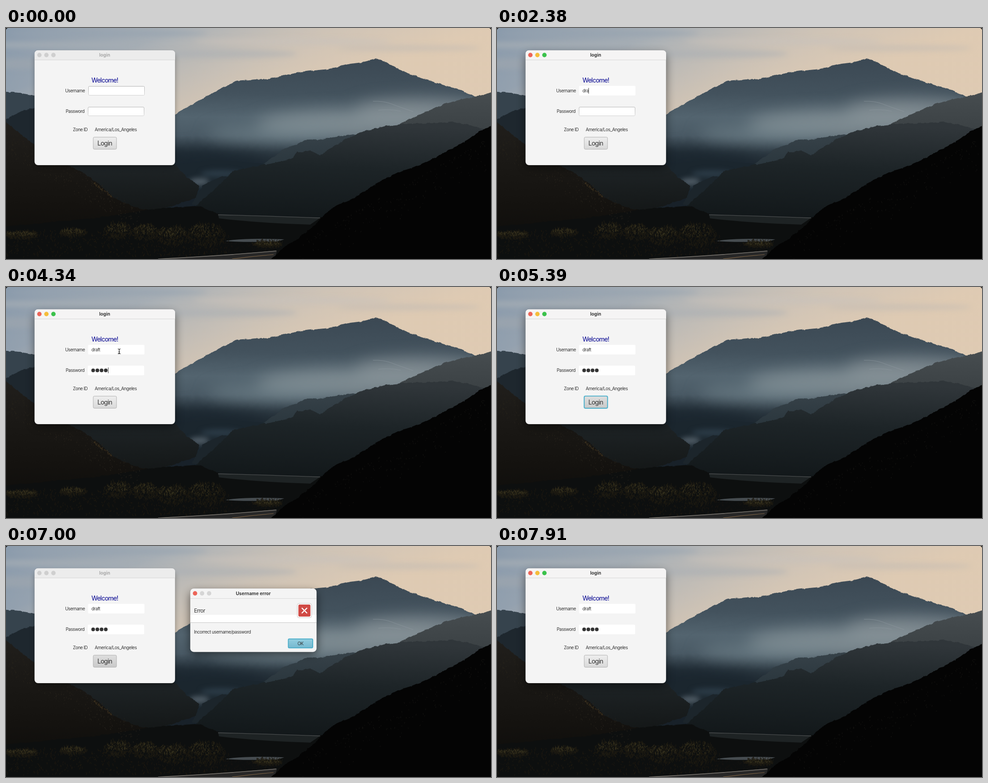
Animation, 1084 px wide and 517 px high, one loop 8 s. Source, as an HTML page:

```html
<!DOCTYPE html>
<html lang="en">
<head>
<meta charset="utf-8">
<title>login</title>
<style>
html, body { margin: 0; width: 100%; height: 100%; overflow: hidden; background: #0b0e10; }
svg { position: absolute; left: 0; top: 0; }
filter { color-interpolation-filters: sRGB; }
text { font: 10px Inter, sans-serif; letter-spacing: -.057em; fill: #333; }
.mid { text-anchor: middle; }
.big { font-size: 14.1px; }
.title { font-weight: 700; font-size: 10.2px; letter-spacing: 0; fill: #3a3a3a; }
</style>
</head>
<body>
<svg id="photo" width="1084" height="517" viewBox="0 0 1084 517">
  <defs>
    <linearGradient id="sky" x2="1" y2=".12">
      <stop offset="0" stop-color="#8b9bac"/><stop offset=".35" stop-color="#abb1b6"/>
      <stop offset=".65" stop-color="#c1bdb8"/><stop offset="1" stop-color="#cbc1b7"/>
    </linearGradient>
    <linearGradient id="warm" gradientUnits="userSpaceOnUse" x1="480" y1="-30" x2="560" y2="190">
      <stop offset="0" stop-color="#dfccb6" stop-opacity="0"/><stop offset="1" stop-color="#e2ccb2" stop-opacity=".85"/>
    </linearGradient>
    <linearGradient id="peak" gradientUnits="userSpaceOnUse" x1="0" y1="68" x2="0" y2="330">
      <stop offset="0" stop-color="#3b4853"/><stop offset=".3" stop-color="#43525d"/>
      <stop offset=".5" stop-color="#53646f"/><stop offset=".66" stop-color="#4a5a65"/>
      <stop offset=".8" stop-color="#27333c"/><stop offset="1" stop-color="#182129"/>
    </linearGradient>
    <linearGradient id="far" x2="0" y2="1">
      <stop offset="0" stop-color="#474d50"/><stop offset="1" stop-color="#373d40"/>
    </linearGradient>
    <linearGradient id="step" x2="0" y2="1">
      <stop offset="0" stop-color="#374249"/><stop offset="1" stop-color="#28343b"/>
    </linearGradient>
    <linearGradient id="ridge" x1=".3" x2=".2" y2="1">
      <stop offset="0" stop-color="#30363a"/><stop offset=".4" stop-color="#1d2427"/>
      <stop offset="1" stop-color="#101517"/>
    </linearGradient>
    <linearGradient id="left" x2="0" y2="1">
      <stop offset="0" stop-color="#211f1c"/><stop offset=".6" stop-color="#14120f"/><stop offset="1" stop-color="#0a0a09"/>
    </linearGradient>
    <linearGradient id="valley" x2="0" y2="1">
      <stop offset="0" stop-color="#22282b"/><stop offset="1" stop-color="#131616"/>
    </linearGradient>
    <filter id="soft" x="-50%" y="-100%" width="200%" height="300%"><feGaussianBlur stdDeviation="18"/></filter>
    <filter id="haze" x="-50%" y="-100%" width="200%" height="300%"><feGaussianBlur stdDeviation="6"/></filter>
    <filter id="rough" filterUnits="userSpaceOnUse" x="-10" y="0" width="1104" height="530">
      <feTurbulence type="fractalNoise" baseFrequency=".09" numOctaves="3" seed="4"/>
      <feDisplacementMap in="SourceGraphic" scale="5" xChannelSelector="R" yChannelSelector="G"/>
    </filter>
    <clipPath id="peakClip"><path d="M300 232 378 194 450 154 514 120 590 115 660 100 720 94 770 82 795 79 826 70 845 76 900 105 960 124 1020 142 1048 155 1084 162V340H300Z"/></clipPath>
  </defs>

  <rect width="1084" height="240" fill="url(#sky)"/>
  <rect width="1084" height="240" fill="url(#warm)"/>
  <g filter="url(#haze)">
    <ellipse cx="100" cy="38" rx="190" ry="7" fill="#a9afb6" opacity=".7"/>
    <ellipse cx="230" cy="12" rx="220" ry="8" fill="#95a2af" opacity=".6"/>
    <ellipse cx="480" cy="58" rx="170" ry="9" fill="#a8aeb3" opacity=".5"/>
    <ellipse cx="640" cy="30" rx="220" ry="7" fill="#c9c2bb" opacity=".7"/>
    <ellipse cx="900" cy="45" rx="160" ry="7" fill="#bfb9b4" opacity=".5"/>
    <ellipse cx="30" cy="80" rx="110" ry="12" fill="#9da5ae" opacity=".7"/>
  </g>

  <g filter="url(#rough)">
    <path d="M300 230 378 192 450 152 514 118 590 113 660 98 720 92 770 80 795 77 826 68 845 74 900 103 960 122 1020 140 1048 153 1084 160V440H300Z" fill="url(#peak)"/>
  </g>
  <g clip-path="url(#peakClip)">
    <g filter="url(#soft)">
      <ellipse cx="770" cy="216" rx="210" ry="32" fill="#929da2" opacity=".7"/>
      <ellipse cx="600" cy="238" rx="150" ry="22" fill="#76878f" opacity=".6"/>
      <ellipse cx="920" cy="180" rx="140" ry="22" fill="#929b9f" opacity=".7"/>
      <ellipse cx="450" cy="295" rx="130" ry="22" fill="#18232c" opacity=".8"/>
    </g>
    <path d="M820 164q24-1 42 6t48 17M832 184q25-3 50 2" fill="none" stroke="#919ca2" opacity=".6"/>
  </g>
  <g filter="url(#rough)">
    <path d="M860 225 885 212 940 187 980 170 1020 159 1060 152 1084 144 1094 141V260H860Z" fill="url(#far)"/>
    <path d="M560 315 600 288 622 270 650 260 667 251 700 250 730 245 776 237 800 242V320Z" fill="url(#step)"/>
    <path d="M-10 142 30 145 66 152 110 190V300H-10Z" fill="#36434d"/>
    <path d="M-10 208 35 186 66 178 110 190V330H-10Z" fill="#1e272e"/>
  </g>
  <path d="M378 306 470 296 580 304 520 330 430 385 380 340Z" fill="#1b262e"/>
  <g filter="url(#haze)">
    <ellipse cx="432" cy="344" rx="22" ry="8" fill="#65737c" opacity=".7"/>
    <ellipse cx="480" cy="326" rx="45" ry="8" fill="#334450" opacity=".7"/>
  </g>
  <g filter="url(#rough)">
    <path d="M415 395 440 352 480 333 510 330 470 400Z" fill="#1c252b"/>
    <path d="M420 400 470 358 510 319 560 309 600 302 640 291 650 279 680 274 702 285 730 266 760 248 800 231 850 219 900 214 960 213 1002 210 1030 216 1084 230V450H420Z" fill="url(#ridge)"/>
    <path d="M90 270 378 306 402 332 432 353 425 380 330 412 150 420Z" fill="url(#valley)"/>
    <path d="M-10 202 30 235 66 264 120 298 172 323 206 348 245 382 285 400 340 413 440 425V530H-10Z" fill="url(#left)"/>
    <path d="M-10 445 200 425 330 405 430 398 480 418 640 425 720 424V530H-10Z" fill="#0d0f0f"/>
  </g>
  <path d="M474 418Q560 420 702 425L680 440Q570 437 476 426Z" fill="#1e2324"/>
  <path d="M474 418Q560 420 702 425" fill="none" stroke="#4a4d4e" stroke-width="1.3"/>
  <path d="M490 477Q530 469 622 473L606 478Q540 480 490 477Z" fill="#464c50"/>
  <g id="plants"></g>
  <path d="M335 517Q480 510 606 498L600 517Z" fill="#272727"/>
  <path d="M340 517Q480 510 604 499" fill="none" stroke="#77736d" stroke-width="1.6"/>
  <path d="M505 517Q550 511 598 507" fill="none" stroke="#786044" stroke-width="1.2"/>
  <g filter="url(#rough)">
    <path d="M588 522 620 492 650 473 690 441 716 413 740 397 780 379 830 347 870 326 904 314 942 299 985 276 1020 257 1048 239 1060 230 1094 216V530H588Z" fill="#040404"/>
  </g>
  <g id="scrub"></g>
  <path d="M0 0H4Q1 1 0 4ZM1084 0H1080Q1083 1 1084 4Z" fill="#111"/>
</svg>

<svg id="ui" width="1084" height="517" viewBox="0 0 1084 517">
  <defs>
    <filter id="shade" x="-30%" y="-30%" width="160%" height="170%"><feGaussianBlur stdDeviation="10"/></filter>
    <filter id="shadeLow" x="-30%" y="-30%" width="160%" height="170%"><feGaussianBlur stdDeviation="6"/></filter>
    <linearGradient id="btn" x2="0" y2="1"><stop offset="0" stop-color="#eee"/><stop offset="1" stop-color="#d9d9d9"/></linearGradient>
    <linearGradient id="btnHover" x2="0" y2="1"><stop offset="0" stop-color="#f6f6f6"/><stop offset="1" stop-color="#e2e2e2"/></linearGradient>
    <linearGradient id="btnDown" x2="0" y2="1"><stop offset="0" stop-color="#dedede"/><stop offset="1" stop-color="#c9c9c9"/></linearGradient>
    <linearGradient id="ok" x2="0" y2="1"><stop offset="0" stop-color="#a3dcec"/><stop offset=".5" stop-color="#93d2e5"/><stop offset="1" stop-color="#86c7dc"/></linearGradient>
    <linearGradient id="okHover" x2="0" y2="1"><stop offset="0" stop-color="#b0e4f2"/><stop offset="1" stop-color="#92d1e5"/></linearGradient>
    <linearGradient id="okDown" x2="0" y2="1"><stop offset="0" stop-color="#92cee0"/><stop offset="1" stop-color="#76b8cf"/></linearGradient>
    <linearGradient id="edge" x2="0" y2="1"><stop offset="0" stop-color="#b2b2b2"/><stop offset="1" stop-color="#d2d2d2"/></linearGradient>
  </defs>

  <rect id="shadow" x="64" y="58" width="314" height="254" rx="9"/>
  <rect x="63.7" y="49.7" width="314.2" height="257.400" rx="8" fill="#f4f4f4" stroke="#000" stroke-opacity=".2" stroke-width=".5"/>
  <path id="bar" d="M64 71V58q0-8 8-8H370q8 0 8 8V71Z"/>
  <path d="M64 71.5H378" stroke="#d6d6d6"/>
  <g id="lights"></g>
  <text id="loginTitle" class="title mid" x="220.5" y="63.7">login</text>

  <text class="mid big" x="220.8" y="121.5" style="fill:#00008f">Welcome!</text>
  <text class="mid" x="154.2" y="144">Username</text>
  <text class="mid" x="154.4" y="190.2">Password</text>
  <text class="mid" x="165.9" y="230.5">Zone ID</text>
  <text class="mid" x="245.3" y="230.5" style="letter-spacing:-.045em">America/Los_Angeles</text>

  <rect id="userPlain" x="184.5" y="130.5" width="125" height="20" rx="2" fill="#fff" stroke="url(#edge)"/>
  <rect id="userRing" x="184.2" y="130.2" width="125.3" height="20.300" rx="2.5" fill="#fff" stroke="#3cb0cc" stroke-width="2"/>
  <rect id="userFlat" x="183.5" y="129.5" width="126" height="21.5" rx="2.5" fill="#fff"/>
  <text id="user" x="191" y="144"></text>

  <rect id="passPlain" x="183.5" y="177" width="125" height="19.5" rx="2" fill="#fff" stroke="url(#edge)"/>
  <rect id="passBad" x="183.5" y="177" width="125" height="19.5" rx="2" fill="#ffc0cb" stroke="#d5bfc3"/>
  <rect id="passFlat" x="182.8" y="176" width="126" height="21.5" rx="2.5" fill="#fff"/>
  <g id="dots" fill="#333"></g>
  <text id="badPass" class="mid" x="221" y="207.2" style="fill:#8b0000">Not a valid password</text>
  <rect id="caret" width="1" fill="#333" height="13"/>

  <rect id="loginBtn" x="195" y="244.3" width="52" height="27" rx="2.5"/>
  <rect id="loginGlow" x="193.8" y="243.1" width="54.4" height="29.4" rx="3.5" fill="none" stroke="#8fd3e4" stroke-opacity=".6"/>
  <text class="mid big" x="220.7" y="263">Login</text>

  <g id="dialog">
    <rect x="412" y="103" width="282" height="138" rx="9" filter="url(#shade)" opacity=".6"/>
    <rect x="411.7" y="94.9" width="282.500" height="142.300" rx="8" fill="#f4f4f4" stroke="#000" stroke-opacity=".2" stroke-width=".5"/>
    <path d="M412 117.5H694" stroke="#d9d9d9"/>
    <rect x="412" y="154" width="282" height="17" fill="#fff"/>
    <path d="M412 171.5H694" stroke="#c6c6c6"/>
    <circle cx="422.5" cy="106" r="4.9" fill="#ec6559"/>
    <circle cx="438.2" cy="106" r="4.9" fill="#d5d5d5"/>
    <circle cx="453.9" cy="106" r="4.9" fill="#d5d5d5"/>
    <text class="title mid" x="552.7" y="109.5">Username error</text>
    <text x="420.2" y="149" style="font-size:12px">Error</text>
    <rect x="651" y="128.5" width="32" height="32" rx="4" fill="#fff" stroke="#c9c4c4"/>
    <rect x="653.5" y="131" width="27" height="27" rx="3" fill="#d04a45"/>
    <path d="M661 138.500l12 12m0-12l-12 12" stroke="#fff" stroke-width="2.4"/>
    <text x="420.2" y="196">Incorrect username/password</text>
    <rect id="okBtn" x="631" y="208" width="54.5" height="20" rx="2" stroke="#30a0bf" stroke-width="1.4"/>
    <rect x="630" y="207" width="56.5" height="22" rx="3" fill="none" stroke="#8fd3e4" stroke-opacity=".6"/>
    <text class="mid" x="658" y="221.500">OK</text>
  </g>

  <g id="beam" fill="none">
    <path d="M250 138.500q3 0 3 2v7q0 2-3 2M256 138.500q-3 0-3 2v7q0 2 3 2M251.500 145h3" stroke="#fff" stroke-width="2.4"/>
    <path d="M250 138.500q3 0 3 2v7q0 2-3 2M256 138.500q-3 0-3 2v7q0 2 3 2M251.500 145h3" stroke="#111" stroke-width="1.2"/>
  </g>
</svg>

<script>
const $ = id => document.getElementById(id);
const set = (id, attrs) => { for (const k in attrs) $(id).setAttribute(k, attrs[k]); };
const show = (id, on) => $(id).style.display = on ? '' : 'none';

// Seeded grass and scrub
let seed = 7;
const rnd = () => (seed = seed * 16807 % 2147483647) / 2147483647;
function tuft(id, n, color, length, place) {
  let d = '';
  for (let i = 0; i < n; i++) {
    const [x, y] = place(rnd(), rnd());
    d += `M${x.toFixed(1)} ${y.toFixed(1)}l${((rnd() - .5) * length).toFixed(1)} ${(-rnd() * length).toFixed(1)}`;
  }
  $(id).innerHTML += `<path d="${d}" stroke="${color}" stroke-width="1.1" fill="none"/>`;
}
const bush = (cx, cy, rx, ry) => (a, b) => {
  const r = Math.sqrt(b), q = a * Math.PI * 2;
  return [cx + rx * r * Math.cos(q), cy + ry * r * Math.sin(q)];
};
tuft('plants', 600, '#1d180f', 6, (a, b) => [a * 500, 454 + b * 60]);
tuft('plants', 160, '#141210', 6, (a, b) => [440 + a * 180, 482 + b * 20]);
[[35, 465, 38, 9], [150, 460, 30, 10], [252, 456, 34, 19], [312, 459, 32, 19],
 [372, 466, 38, 23], [448, 465, 42, 28], [585, 486, 35, 8]].forEach(([x, y, rx, ry]) => {
  tuft('plants', rx * 7, '#1d1a11', 8, bush(x, y, rx, ry));
  tuft('plants', rx * 1.5, '#36311d', 6, bush(x - 2, y - ry * .35, rx * .8, ry * .5));
});
tuft('plants', 260, '#25211a', 4, (a, b) => [a * 300, 228 + a * 175 + b * 55]);
tuft('plants', 40, '#40331f', 4, (a, b) => [196 + a * 40, 344 + a * 32 + b * 6]);
tuft('scrub', 200, '#131210', 4, (a, b) => [650 + a * 430, 486 - a * 238 + b * b * 70]);

function render(t) {
  const since = (times) => times.filter(s => t >= s).length;
  const alert = t >= 5600 && t < 7140;
  const active = t >= 1470 && !alert;

  // Window chrome
  set('shadow', { filter: active ? 'url(#shade)' : 'url(#shadeLow)', opacity: active ? .5 : .3 });
  set('bar', { fill: active ? '#f5f4f4' : '#ececec' });
  $('loginTitle').style.fill = active ? '#3a3a3a' : '#a9a9a9';
  const colors = active ? ['#ec6559', '#f5bd3b', '#3bc24c'] : Array(3).fill('#cfcfcf');
  $('lights').innerHTML = colors.map((c, i) =>
    `<circle cx="${74.6 + i * 15.7}" cy="60.500" r="4.900" fill="${c}"/>`).join('');

  // Fields
  const typed = since([2100, 2240, 2380, 2730, 2870]);
  const dots = since([3920, 4060, 4200, 4340]);
  const bad = t >= 3290 && !dots;
  show('userPlain', t < 1470);
  show('userRing', t >= 1470 && !typed);
  show('userFlat', typed);
  $('user').textContent = 'draft'.slice(0, typed);
  show('passPlain', t < 3290);
  show('passBad', bad);
  show('badPass', bad);
  show('passFlat', dots);
  $('dots').innerHTML = [0, 1, 2, 3].slice(0, dots).map(i =>
    `<circle cx="${194.8 + i * 9.4}" cy="186.700" r="4.100"/>`).join('');

  // Caret and pointer
  const inPass = t >= 3290;
  show('caret', t >= 1470 && t < 4830 && !(t >= 1960 && t < 2100) && !(t >= 3780 && t < 3920));
  set('caret', inPass ? { x: 189.6 + dots * 9.6, y: 180 }
                      : { x: 190.5 + (typed && $('user').getComputedTextLength()), y: 134 });
  show('beam', t >= 3290 && t < 4690);

  // Buttons
  const pressed = t >= 5390 && t < 5600;
  const look = t >= 5390 && t < 7140 ? 'btnDown' : t >= 5110 && t < 5390 ? 'btnHover' : 'btn';
  set('loginBtn', { fill: `url(#${look})`, stroke: pressed ? '#35a5c3' : '#b0b0b0', 'stroke-width': pressed ? 1.6 : 1 });
  show('loginGlow', pressed);
  show('dialog', alert);
  set('okBtn', { fill: `url(#${t < 6580 ? 'ok' : t < 7000 ? 'okHover' : 'okDown'})` });
}

const start = performance.now();
(function tick() {
  render((performance.now() - start) % 8000);
  requestAnimationFrame(tick);
})();
</script>
</body>
</html>
```
